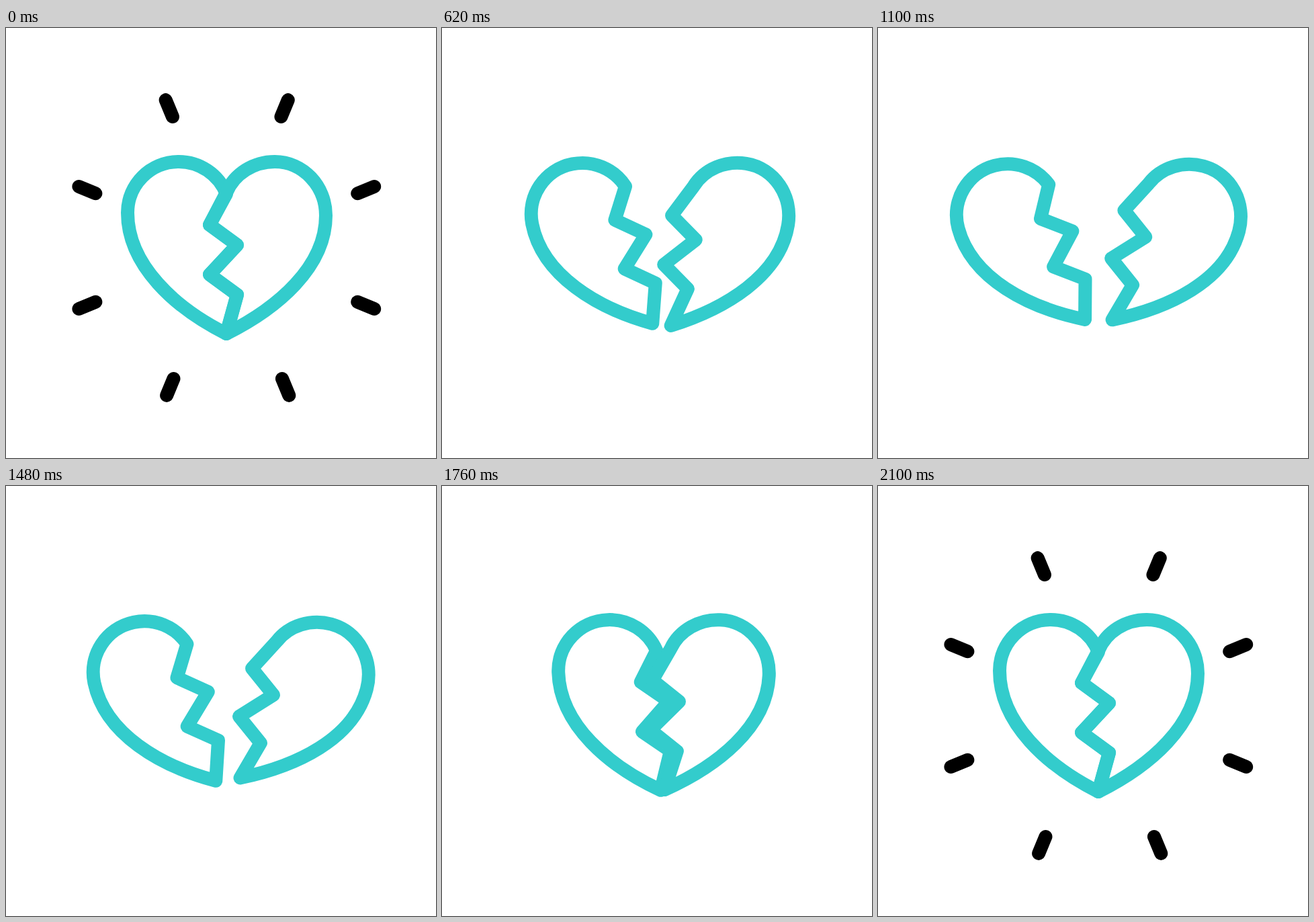
Recreate the animation shown at these times as an HTML page. Size 640 by 640 pixels, loop 2320 ms.

```html
<!DOCTYPE html>
<html lang="en">
<head>
<meta charset="utf-8">
<title>Breaking heart</title>
<style>
  html, body { margin: 0; width: 100%; height: 100%; overflow: hidden; background: #fff; }
  svg { display: block; width: 100vw; height: 100vh; }
  path { fill: none; stroke-width: 20; stroke-linecap: round; stroke-linejoin: round; }
  #left, #right { stroke: #3cc; }
  #rays { stroke: #000; }
</style>
</head>
<body>
<svg viewBox="0 0 640 640">
  <path id="rays"/>
  <path id="left"/>
  <path id="right"/>
</svg>
<script>
const LOOP = 2320;
const crack = "L344 397 303 367 344 323 303 293Z";
const [rays, left, right] = ["rays", "left", "right"].map(id => document.getElementById(id));

left.setAttribute("d", "M328 247A76.3 76.3 0 0 0 257 199C215 199 181 233 181 275C181 353 252 417 328 455" + crack);
right.setAttribute("d", "M328 245C340 216.5 369 199 400 199C442 199 476 235 476 279C476 356 404 417 328 455" + crack);

const clamp = x => Math.min(1, Math.max(0, x));
const easeOut = x => 1 - (1 - clamp(x)) ** 3;

// open runs from 0 (whole heart) to 1 (fully apart)
function poseHalf(half, open, dx, dy, angle) {
  half.setAttribute("transform", `translate(${dx * open} ${dy * open}) rotate(${angle * open} 324.4 367)`);
}

// Rays span the radii from r0 to r1
function drawRays(r0, r1) {
  let d = "";
  for (let i = 0; i < 8 && r1 - r0 > 0.01; i++) {
    const a = (i + 0.5) * Math.PI / 4;
    const cx = 328.3 + (i === 1 || i === 2 ? 1.9 : i === 5 || i === 6 ? 0.4 : 0);
    const at = r => `${cx + r * Math.cos(a)} ${327 + r * Math.sin(a)}`;
    d += `M${at(r0)}L${at(r1)}`;
  }
  rays.setAttribute("d", d);
}

function draw() {
  const t = performance.now() % LOOP;
  const closing = t >= 1480;
  const leftOpen = closing ? 1 - easeOut((t - 1433) / 643) : easeOut((t - 380) / 660);
  const rightOpen = closing ? 1 - easeOut((t - 1480) / 620) : easeOut((t - 440) / 660);
  poseHalf(left, leftOpen, -42.6, -17.2, -15);
  poseHalf(right, rightOpen, 43.5, -18.6, 15);

  const inner = 211, outer = 238, span = outer - inner;
  if (closing) drawRays(inner, inner + span * clamp((t - 1795) / 300));
  else drawRays(inner + span * clamp((t - 210) / 294), outer);
  requestAnimationFrame(draw);
}
draw();
</script>
</body>
</html>
```
